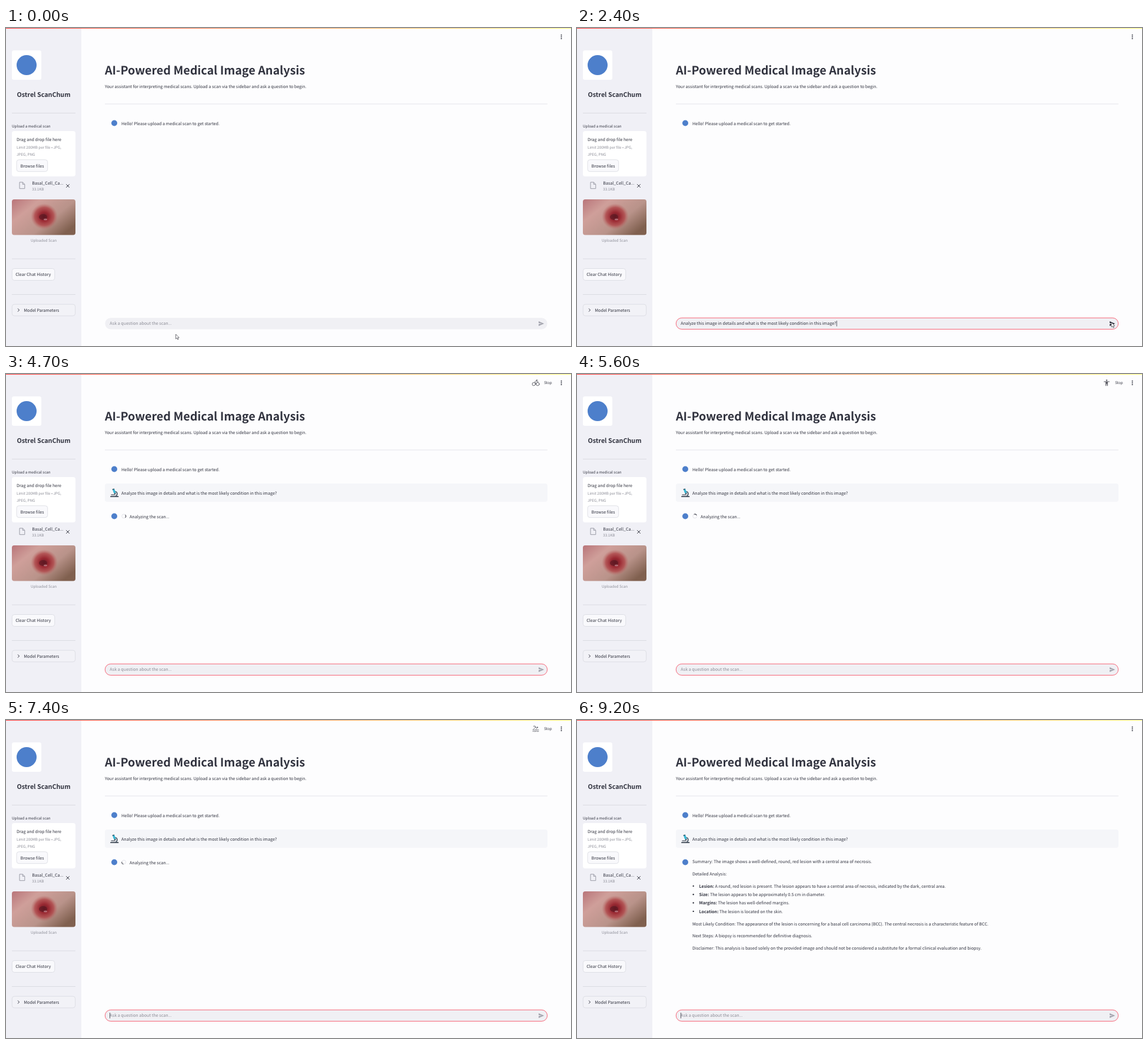
Write an HTML page that moves like this. It is 960 px wide and 540 px high and loops after 9700 ms.

```html
<!DOCTYPE html>
<html lang="en">
<head>
<meta charset="utf-8">
<title>Medical image chat</title>
<style>
html, body { margin: 0; width: 100%; height: 100%; overflow: hidden; background: #fdfdfe; }
svg { display: block; width: 100vw; height: 100vh; }
text {
  font-family: "Noto Sans CJK JP", "Noto Sans CJK SC", "Noto Sans CJK KR", "Noto Sans CJK TC", "Noto Sans CJK", "Open Sans", sans-serif;
  fill: #31333f;
  text-rendering: geometricPrecision;
  white-space: pre;
}
.b { font-weight: 700; }
.soft { fill: #8b8c96; }
.line { stroke: #d5d6dd; stroke-width: .8; }
.btn { fill: #f9f9fc; stroke: #d5d6dd; stroke-width: .7; }
.ink { fill: none; stroke: #31333f; stroke-linecap: round; stroke-linejoin: round; }
.sport { fill: none; stroke: #55565f; stroke-width: .9; stroke-linecap: round; stroke-linejoin: round; }
.sport .dot { fill: #55565f; stroke: none; }
</style>
</head>
<body>
<svg id="stage" viewBox="0 0 960 540" xmlns="http://www.w3.org/2000/svg"></svg>
<script>
const LOOP = 9700;
const LATIN = 1 / 1.117; // nominal size to CJK-font size
const QUESTION = 'Analyze this image in details and what is the most likely condition in this image?';

const text = (x, y, str, size = 8, extra = '') =>
  `<text x="${x}" y="${y}" font-size="${(size * LATIN).toFixed(3)}" ${extra}>${str}</text>`;
const rect = (x, y, w, h, r, extra) =>
  `<rect x="${x}" y="${y}" width="${w}" height="${h}" rx="${r}" ${extra}/>`;
const rule = (x1, x2, y, extra = '') =>
  `<line class="line" x1="${x1}" x2="${x2}" y1="${y}" y2="${y}" ${extra}/>`;
const mark = (x, y, r) => `<circle cx="${x}" cy="${y}" r="${r}" fill="#4d7fcb"/>`;
const group = (id, body, extra = '') => `<g id="${id}" ${extra}>${body}</g>`;
const bullet = (y, head, body) =>
  `<circle cx="197.7" cy="${y - 2.6}" r="1.2" fill="#31333f"/>` +
  text(207.6, y, `<tspan class="b">${head}:</tspan> ${body}`);

const defs = `<defs>
  <linearGradient id="bar"><stop stop-color="#ff4b4b"/><stop offset="1" stop-color="#fffd80"/></linearGradient>
  <linearGradient id="skin" x1="0" y1="0" x2="1" y2=".7">
    <stop stop-color="#b9757a"/><stop offset=".3" stop-color="#cf9f9a"/>
    <stop offset=".68" stop-color="#b9938a"/><stop offset="1" stop-color="#80604f"/>
  </linearGradient>
  <radialGradient id="sore">
    <stop stop-color="#6d1b25"/><stop offset=".35" stop-color="#9a2a33"/>
    <stop offset=".7" stop-color="#b04a4c" stop-opacity=".85"/><stop offset="1" stop-color="#bd6f6c" stop-opacity="0"/>
  </radialGradient>
  <clipPath id="frame">${rect(10, 291, 108, 60.5, 4, '')}</clipPath>
</defs>`;

const photo = `<g clip-path="url(#frame)">
  <rect x="10" y="291" width="108" height="61" fill="url(#skin)"/>
  <ellipse cx="65" cy="320" rx="23" ry="22" fill="url(#sore)"/>
  <ellipse cx="63" cy="321" rx="7" ry="5" fill="#561721" opacity=".6"/>
  <ellipse cx="67" cy="325" rx="3" ry="1.6" fill="#cf9aa2" opacity=".6"/>
</g>`;

const sidebar =
  rect(0, 0, 128, 540, 0, 'fill="#f0f0f6"') +
  rect(10, 38, 50, 50, 3.5, 'fill="#fff"') + mark(35, 63, 17) +
  text(64, 117.3, 'Ostrel ScanChum', 12, 'class="b" text-anchor="middle"') +
  [144.5, 392, 452.5].map(y => rule(10, 118, y)).join('') +
  text(10, 169.2, 'Upload a medical scan', 7) +
  rect(10, 175, 108, 77, 4, 'fill="#fff"') +
  text(18, 192, 'Drag and drop file here') +
  text(18, 205.2, 'Limit 200MB per file • JPG,', 7, 'class="soft"') +
  text(18, 216.5, 'JPEG, PNG', 7, 'class="soft"') +
  rect(18, 223.7, 52.7, 20, 4, 'class="btn"') + text(24.5, 236.6, 'Browse files') +
  '<path d="M23 261.9h5.3l3.5 3.4v7.4h-8.8z M28.2 262v3.4h3.5" fill="none" stroke="#999aa5" stroke-width="1" stroke-linejoin="round"/>' +
  text(44.2, 265.7, 'Basal_Cell_Ca...') +
  text(44.2, 276.4, '33.1KB', 7, 'class="soft"') +
  '<path class="ink" stroke-width="1" d="M102.5 265.6l5 5m0-5l-5 5"/>' +
  photo +
  text(64, 363.2, 'Uploaded Scan', 7, 'class="soft" text-anchor="middle"') +
  rect(10.3, 408.5, 72.4, 20, 4, 'class="btn"') + text(16.2, 421.1, 'Clear Chat History') +
  rect(10.3, 469.2, 107.4, 19.6, 4, 'class="btn" style="fill:#f2f2f7"') +
  '<path class="ink" stroke-width="1" d="M20.3 476.7l2.2 2.3l-2.2 2.3"/>' +
  text(30.3, 481.7, 'Model Parameters');

const header =
  '<rect width="960" height="1.1" fill="url(#bar)"/>' +
  [12, 15, 18].map(y => `<circle cx="943.6" cy="${y}" r="1.05" fill="#31333f"/>`).join('') +
  text(168, 78.7, 'AI-Powered Medical Image Analysis', 22, 'class="b"') +
  text(168, 101.6, 'Your assistant for interpreting medical scans. Upload a scan via the sidebar and ask a question to begin.') +
  rule(168, 920, 129, 'style="stroke:#dfdfe4"') +
  mark(184, 161.5, 5) + text(196, 164.6, 'Hello! Please upload a medical scan to get started.');

const microscope = `<g transform="translate(177 195)">
  <path d="M1 13.2h12.5" stroke="#3c4653" stroke-width="1.8" stroke-linecap="round"/>
  <path d="M8.5 4.5c4 .6 4.6 5.4 1 8" fill="none" stroke="#4c5a68" stroke-width="1.7"/>
  <path d="M1.5 10.2h7" stroke="#59636f" stroke-width="1.4"/>
  <path d="M4 1.2l3.2-1l2.6 6.6l-3.3 1.2z" fill="#38b5d2"/>
  <path d="M6.6 8l2.6-.9l.5 1.3l-2.4.9z" fill="#2b3340"/>
  <path d="M3.7 1.2l3.3-1.1" stroke="#27485a" stroke-width="1.3"/>
</g>`;

const sports = [
  `<circle cx="896.8" cy="17.1" r="2.7"/><circle cx="903.5" cy="17.1" r="2.7"/>
   <circle class="dot" cx="902" cy="10.7" r="1.1"/><path d="M900.2 17.6v-2.5l-2-1.6l2.4-2l1.6 1.7h2"/>`,
  `<circle class="dot" cx="900" cy="10.6" r="1.2"/>
   <path d="M895.6 13h8.8M898.7 13.2v6.5M901.3 13.2v6.5M900 13v3.6" stroke-width="1.2"/>`,
  `<path d="M895 16.7q1.3-1 2.5 0t2.5 0t2.5 0t2.5 0M895 19.2q1.3-1 2.5 0t2.5 0t2.5 0t2.5 0"/>
   <circle class="dot" cx="903" cy="12.6" r="1.1"/><path d="M896.4 10.5l2.7-.1l2.5 4M896.8 14.7l2.9-2.5"/>`
];
const status =
  sports.map((s, i) => group('sport' + i, s, 'class="sport"')).join('') +
  text(914.2, 17.4, 'Stop', 7);

const spinner =
  '<circle cx="200.2" cy="241.4" r="3.4" fill="none" stroke="#e4e4ea" stroke-width="1"/>' +
  group('arc', '<path d="M-2.4 -2.4A3.4 3.4 0 0 1 2.4 -2.4" fill="none" stroke="#4a4b56" stroke-width="1.1"/>') +
  text(210, 244.6, 'Analyzing the scan...');

const answer =
  text(196, 242.6, 'Summary: The image shows a well-defined, round, red lesion with a central area of necrosis.') +
  text(196, 263.5, 'Detailed Analysis:') +
  bullet(284.5, 'Lesion', 'A round, red lesion is present. The lesion appears to have a central area of necrosis, indicated by the dark, central area.') +
  bullet(298.8, 'Size', 'The lesion appears to be approximately 0.5 cm in diameter.') +
  bullet(313.1, 'Margins', 'The lesion has well-defined margins.') +
  bullet(327.5, 'Location', 'The lesion is located on the skin.') +
  text(196, 348.5, 'Most Likely Condition: The appearance of the lesion is concerning for a basal cell carcinoma (BCC). The central necrosis is a characteristic feature of BCC.') +
  text(196, 369.2, 'Next Steps: A biopsy is recommended for definitive diagnosis.') +
  text(196, 390, 'Disclaimer: This analysis is based solely on the provided image and should not be considered a substitute for a formal clinical evaluation and biopsy.');

const input =
  rect(168.3, 492.3, 751.4, 19.2, 9.6, 'id="field" fill="#f0f0f4" stroke-width=".9"') +
  text(176.3, 504.2, 'Ask a question about the scan...', 8, 'id="hint" class="soft"') +
  text(176.3, 504.2, QUESTION, 8, 'id="typed"') +
  '<rect id="caret" y="497" width=".8" height="9.6" fill="#31333f"/>' +
  '<path id="send" d="M905 497.9l9.3 4l-9.3 4v-3.1l6-.9l-6-.9z"/>';

const pointer = '<path d="M0 0v8l1.9-1.7l1.3 2.8l1.3-.6l-1.3-2.7h2.5z" fill="#fff" stroke="#3a3a42" stroke-width=".7" stroke-linejoin="round"/>';

const stage = document.getElementById('stage');
stage.innerHTML = defs + '<rect width="960" height="540" fill="#fdfdfe"/>' + sidebar + header +
  group('ask', rect(168, 186, 752, 31, 4, 'fill="#f5f6f9"') + microscope + text(196, 204.6, QUESTION)) +
  group('reply', mark(184, 241.5, 5)) +
  group('status', status) + group('spinner', spinner) + group('answer', answer) +
  input + group('pointer', pointer);

const el = {};
stage.querySelectorAll('[id]').forEach(n => el[n.id] = n);
const show = (id, on) => { el[id].style.display = on ? '' : 'none'; };

// time, x, y of the mouse tip
const path = [
  [0, 288.5, 520], [100, 288.5, 520], [300, 296, 501], [1500, 296, 501], [2100, 908, 500],
  [2500, 908, 500], [3000, 906.8, 441], [3400, 906.8, 441], [3900, 966, 418]
];
function mouseAt(t) {
  const i = path.findIndex(p => p[0] > t);
  if (i < 0) return path[path.length - 1].slice(1);
  const [t0, x0, y0] = path[i - 1], [t1, x1, y1] = path[i];
  const u = (t - t0) / (t1 - t0), e = u * u * (3 - 2 * u);
  return [x0 + (x1 - x0) * e, y0 + (y1 - y0) * e];
}

const between = (t, a, b) => t >= a && t < b;
const mod = (a, n) => ((a % n) + n) % n;
const typedEnd = 176.3 + el.typed.getComputedTextLength() + .3;

function draw(t) {
  const focused = t >= 400, typed = between(t, 600, 2500);
  el.field.setAttribute('stroke', focused ? '#f5566a' : 'none');
  show('hint', !typed);
  show('typed', typed);
  el.send.setAttribute('fill', typed ? '#31333f' : '#a2a3ad');
  el.caret.setAttribute('x', typed ? typedEnd : 176.2);
  const blink = typed ? t < 1630 || t >= 2160 : mod(t - 9200, 1060) < 530;
  show('caret', focused && blink);

  show('ask', t >= 2600);
  show('reply', t >= 2900);
  show('status', between(t, 2500, 8500));
  const sport = mod(Math.floor((t - 3290) / 464), 3);
  sports.forEach((_, i) => show('sport' + i, i === sport));

  show('spinner', between(t, 3700, 8400));
  el.arc.setAttribute('transform', `translate(200.2 241.4) rotate(${90 + (t - 4700) * 360 / 500})`);
  show('answer', t >= 8400);

  show('pointer', t < 600 || between(t, 1500, 3900));
  el.pointer.setAttribute('transform', `translate(${mouseAt(t).join(' ')})`);
}

const start = performance.now();
function tick() {
  draw((performance.now() - start) % LOOP);
  requestAnimationFrame(tick);
}
tick();
</script>
</body>
</html>
```
